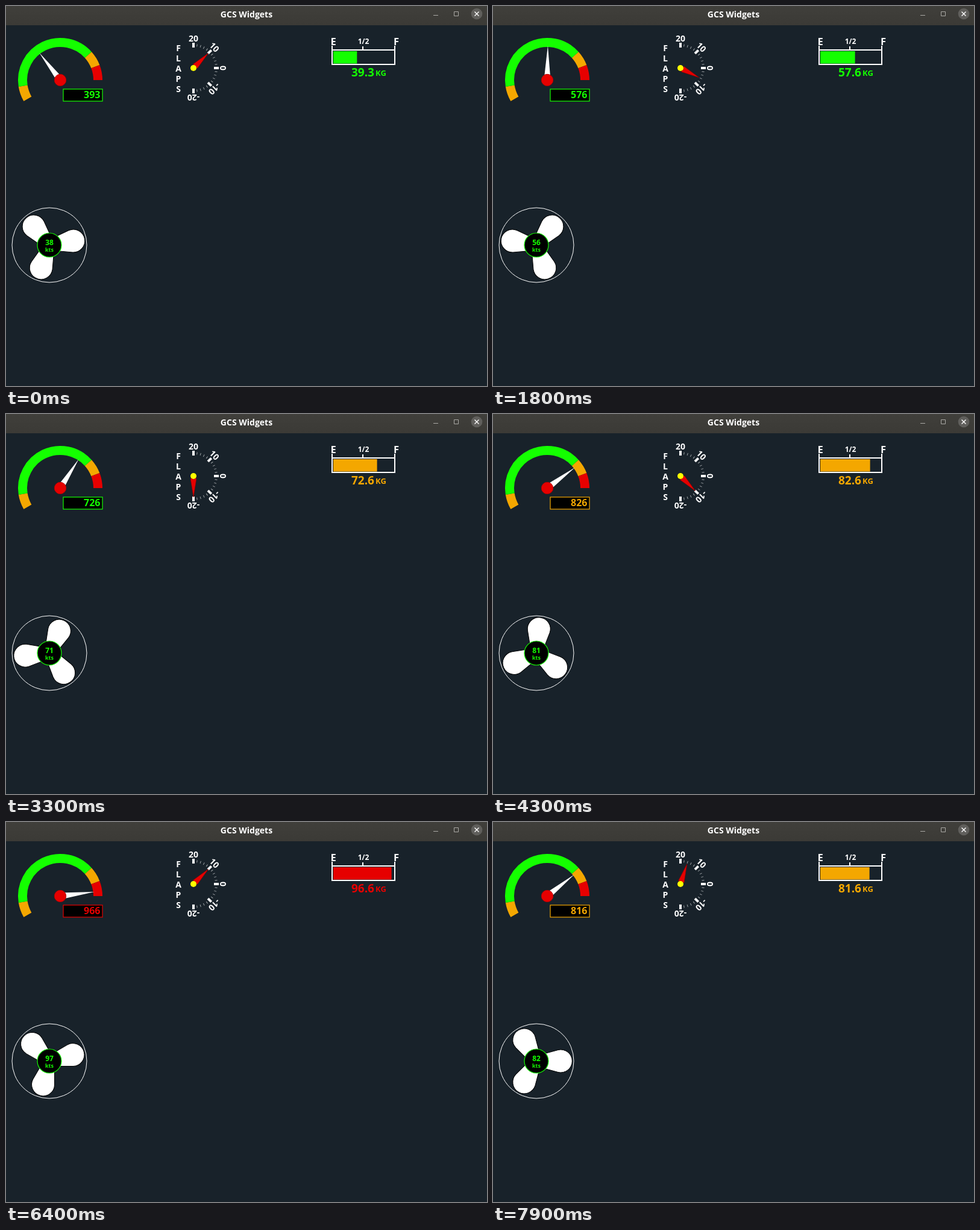
Recreate the animation shown at these times as an HTML page. Size 798 by 631 pixels, loop 8000 ms.

```html
<!DOCTYPE html>
<html lang="en">
<head>
<meta charset="utf-8">
<title>GCS Widgets</title>
<style>
html, body { margin: 0; width: 100%; height: 100%; overflow: hidden; background: #18222a; }
svg { display: block; }
text { font: bold 14px "Open Sans", "Noto Sans", sans-serif; fill: #fff; text-anchor: middle; }
</style>
</head>
<body>
<svg width="798" height="631" viewBox="0 0 798 631">
  <defs>
    <linearGradient id="bar" x2="0" y2="1">
      <stop stop-color="#403f3b"/><stop offset="1" stop-color="#3b3a36"/>
    </linearGradient>
    <path id="blade" d="M14-12.5L36-18.5A19 19 0 1 1 36 18.5L14 12.5Z" fill="#fff" stroke="#000"/>
  </defs>

  <rect width="798" height="32" fill="url(#bar)"/>
  <text x="399" y="18.5">GCS Widgets</text>
  <g fill="none" stroke="#aaa9a5">
    <path d="M709 15.5h8M743.5 9.5h7v7h-7z"/>
    <circle cx="781" cy="13" r="9.3" fill="#605f5c" stroke="none"/>
    <path d="M777.5 9.5l7 7m0-7l-7 7" stroke="#fff" stroke-width="1.4"/>
  </g>

  <g transform="translate(90 123)">
    <g id="arcs" fill="none" stroke-width="15"></g>
    <path id="rpmNeedle" d="M0-5.5L57 0L0 5.5Z" fill="#fff"/>
    <circle r="9.7" fill="#e60000" stroke="#b80000"/>
    <rect id="rpmBox" x="5" y="15" width="65" height="20" stroke-width="1.2"/>
    <text id="rpm" x="66.5" y="30" style="font-size:16px;text-anchor:end"></text>
  </g>

  <g id="flaps" transform="translate(311 103)">
    <g id="scale"></g>
    <path id="flapNeedle" d="M-5-4L0-35L5-4Z" fill="#e60000" stroke="#8c0000" stroke-width=".6"/>
    <circle r="5" fill="#ff0"/>
  </g>

  <g fill="none" stroke="#fff" stroke-width="2">
    <path d="M541 66V97H645V66M541 73H645M592 67V73"/>
  </g>
  <text x="543" y="65" style="font-size:16.5px">E</text>
  <text x="593" y="63" style="font-size:12px">1/2</text>
  <text x="647.5" y="65" style="font-size:16.5px">F</text>
  <rect id="fuelBar" x="543" y="75" height="20.5"/>
  <text id="fuel" x="573" y="117" style="font-size:19px;text-anchor:start"></text>
  <text id="unit" x="622" y="116" style="font-size:13px">KG</text>

  <g transform="translate(72 397)">
    <circle r="62" fill="none" stroke="#fff"/>
    <g id="prop">
      <use href="#blade"/>
      <use href="#blade" transform="rotate(120)"/>
      <use href="#blade" transform="rotate(240)"/>
    </g>
    <circle r="20" stroke="#14ff00" stroke-width="1.2"/>
    <text id="speed" style="font-size:12px;fill:#14ff00"></text>
    <text y="11" style="font-size:9px;fill:#14ff00">kts</text>
  </g>
</svg>
<script>
const GREEN = '#14ff00', ORANGE = '#f4a700', RED = '#e60000';
const LOOP = 8000, STEP = 100;
const $ = id => document.getElementById(id);

function add(parent, tag, attrs, text = '') {
  const el = document.createElementNS('http://www.w3.org/2000/svg', tag);
  for (const name in attrs) el.setAttribute(name, attrs[name]);
  el.textContent = text;
  parent.append(el);
}

// [time, value] points joined by straight lines
const rpmKeys = [[-100, 383], [0, 393], [1800, 576], [3300, 726], [4300, 826],
  [5700, 959], [6090, 998], [6400, 966], [7900, 816]];
const flapKeys = [[0, 10], [1800, -6], [3250, -20], [4300, -10], [5700, 2],
  [6400, 10], [7430, 20], [7900, 16]];
const propKeys = [[0, 110], [1800, 310], [3300, 534], [4300, 756], [5700, 1122],
  [6400, 1305], [7900, 1680]];

function valueAt(keys, t) {
  let i = 1;
  while (i < keys.length - 1 && t > keys[i][0]) i++;
  const [t0, a] = keys[i - 1], [t1, b] = keys[i];
  return a + (b - a) * (t - t0) / (t1 - t0);
}

// Dial angle in degrees, clockwise from the right
const rpmAngle = v => v * 0.21 - 210;

function arc(from, to, stroke) {
  const point = v => {
    const a = rpmAngle(v) * Math.PI / 180;
    return `${62.5 * Math.cos(a)} ${62.5 * Math.sin(a)}`;
  };
  add($('arcs'), 'path', { d: `M${point(from)}A62.5 62.5 0 0 1 ${point(to)}`, stroke });
}
arc(0, 100, ORANGE);
arc(100, 800, GREEN);
arc(800, 900, ORANGE);
arc(900, 1000, RED);

const flapAngle = v => 90 - 4.5 * v;
for (let v = -20; v <= 20; v += 2) {
  const transform = `rotate(${flapAngle(v)})`, major = v % 10 === 0;
  add($('scale'), 'path', {
    d: major ? 'M0-34V-42' : 'M0-36V-40', transform,
    stroke: major ? '#fff' : '#a0a5a8', 'stroke-width': major ? 4 : 1
  });
  if (major) add($('scale'), 'text', { y: -44, transform }, v);
}
[...'FLAPS'].forEach((c, i) => add($('flaps'), 'text', { x: -25, y: -28 + 17 * i }, c));

const turn = (id, angle) => $(id).setAttribute('transform', `rotate(${angle})`);
const level = (v, warn) => v >= 900 ? RED : v >= warn ? ORANGE : GREEN;

function draw(t) {
  const v = Math.round(valueAt(rpmKeys, t));
  const rpmColor = level(v, 800), fuelColor = level(v, 700);

  turn('rpmNeedle', rpmAngle(v));
  $('rpm').textContent = v;
  $('rpm').style.fill = rpmColor;
  $('rpmBox').setAttribute('stroke', rpmColor);

  turn('flapNeedle', flapAngle(Math.round(valueAt(flapKeys, t))));

  $('fuelBar').setAttribute('width', v / 10);
  $('fuel').textContent = (v / 10).toFixed(1);
  for (const id of ['fuelBar', 'fuel', 'unit']) $(id).style.fill = fuelColor;

  turn('prop', valueAt(propKeys, t));
  // The air speed trails slightly behind
  $('speed').textContent = Math.floor(valueAt(rpmKeys, t - 70) / 10);
}

const start = performance.now();
function frame() {
  const t = (performance.now() - start) % LOOP;
  draw(Math.floor(t / STEP) * STEP);
  requestAnimationFrame(frame);
}
frame();
</script>
</body>
</html>
```
